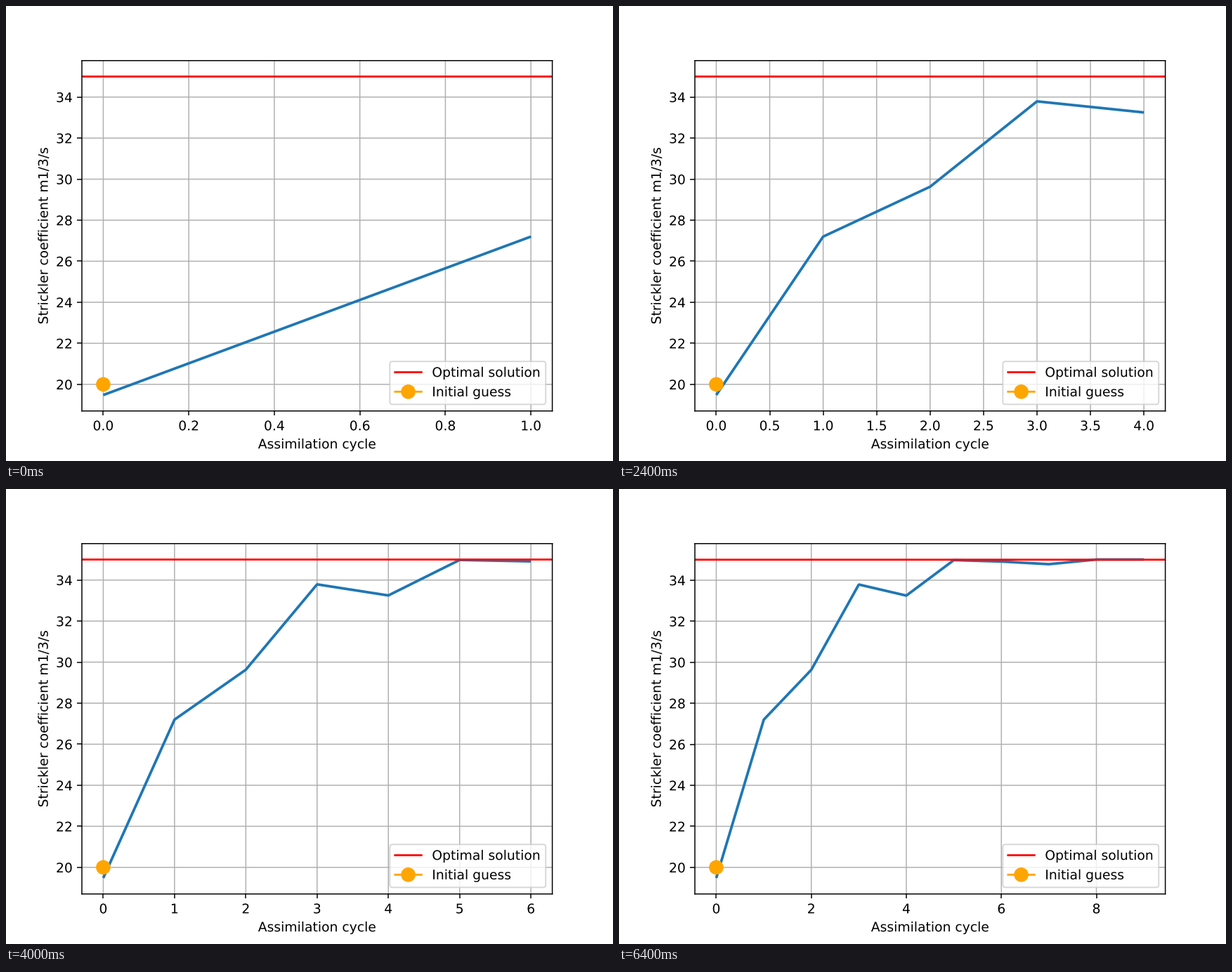
Write a matplotlib script that moves like this. It is 864 by 648 pixels and loops after 7200 ms.

```python
import matplotlib.pyplot as plt
from matplotlib.animation import FuncAnimation
from matplotlib.patheffects import Normal

# Smooth vector text and lines placed between whole pixels
plt.rcParams.update({"path.snap": False, "path.effects": [Normal()],
                     "text.hinting": "none"})

OPTIMUM = 35
GUESS = 20
SETTLED = OPTIMUM + 0.008
APPROACH = [19.48, 27.20, 29.63, 33.79, 33.25, 34.98, 34.91, 34.78]
LAST_CYCLE = 9

fig, ax = plt.subplots(figsize=(6.4, 4.8), dpi=135)


def strickler(cycle):
    """Estimated coefficient, constant once it has converged."""
    return APPROACH[cycle] if cycle < len(APPROACH) else SETTLED


def draw(i):
    """Show the estimates of cycles 0 to i + 1."""
    ax.clear()
    cycles = range(i + 2)
    ax.plot(cycles, [strickler(c) for c in cycles], color="tab:blue", lw=2,
            solid_capstyle="butt", solid_joinstyle="bevel")
    ax.axhline(OPTIMUM, color="red", lw=1.5, label="Optimal solution")
    ax.plot(0, GUESS, color="orange", marker="o", markersize=10,
            label="Initial guess")
    ax.set_xlabel("Assimilation cycle")
    ax.set_ylabel("Strickler coefficient m1/3/s")
    ax.grid(True)
    ax.legend(loc="lower right")


anim = FuncAnimation(fig, draw, frames=LAST_CYCLE, interval=800,
                     init_func=lambda: None, repeat=True, repeat_delay=0)
plt.show()
```
